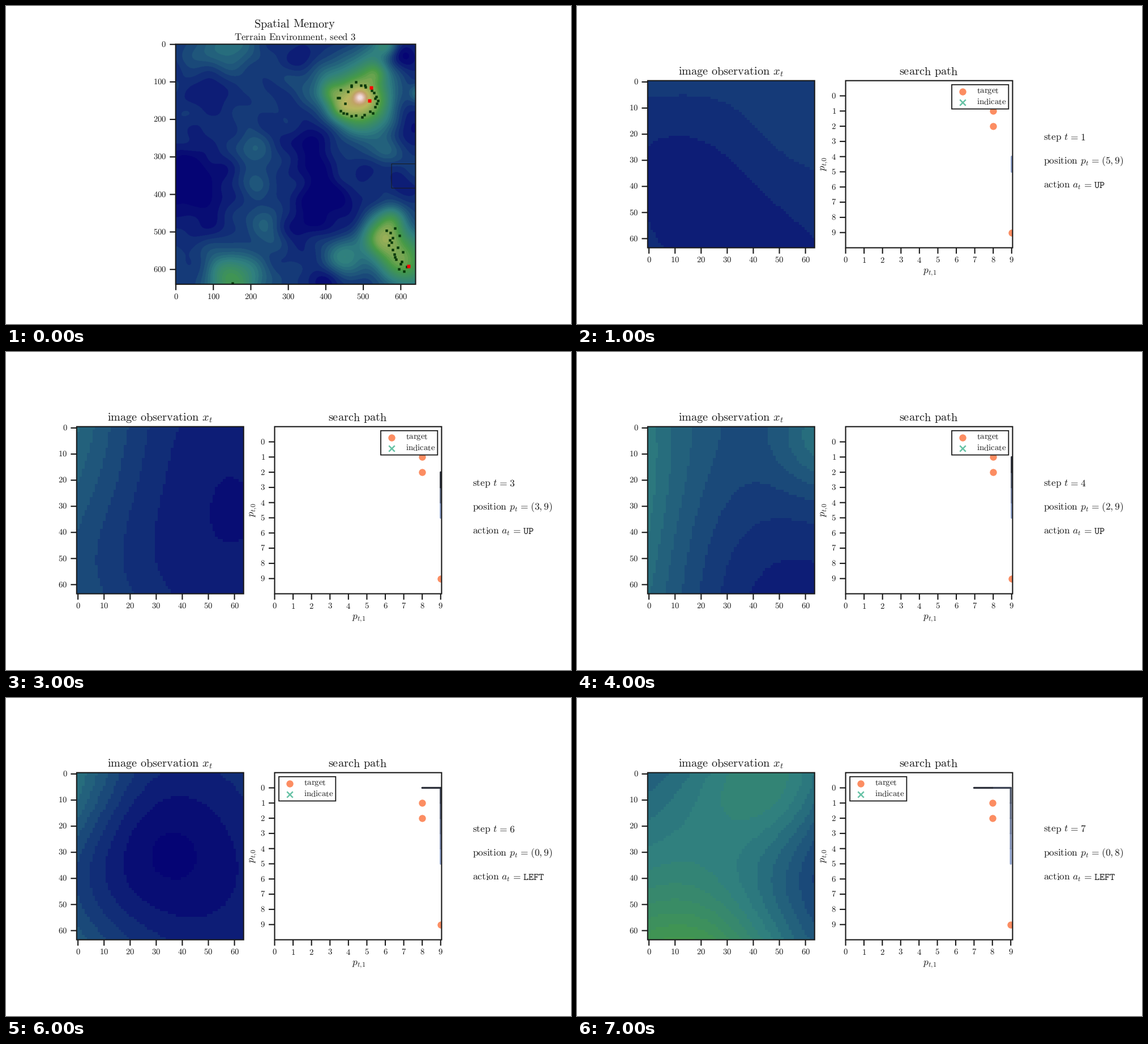
These frames come from a looping animation (998x561 px, 8000 ms). A matplotlib script:

```python
import matplotlib.pyplot as plt
import numpy as np
from matplotlib.animation import FuncAnimation
from matplotlib.colors import to_rgb
from matplotlib.patches import Rectangle

W, H, DPI = 998, 561, 64
PT = 72 / DPI  # points per pixel
INK = "0.1"
ORANGE, GREEN, BLUE, DARK = "#fc8d62", "#66c2a5", "#8da0cb", "#2b2f3a"
SIZE, CELL = 640, 64  # map and view side

plt.rcParams.update({"mathtext.fontset": "cm", "path.snap": False,
                     "text.hinting": "none"})
fig = plt.figure(figsize=(W / DPI, H / DPI), dpi=DPI, facecolor="white")
ax = fig.add_axes([0, 0, 1, 1])


# ---- terrain: round hills and pits, plus gentle noise -----------------

# x, y, radius, height
NORTH = [(490, 145, 58, 17), (490, 150, 42, 7), (491, 141, 12, 9),
         (412, 128, 20, 5), (440, 172, 22, 5), (533, 78, 20, 5),
         (520, 35, 28, 4.5), (560, 0, 22, 7), (648, 130, 15, 5)]
SOUTH = [(548, 508, 36, 14), (577, 468, 25, 7), (605, 572, 46, 16),
         (450, 560, 38, 7), (155, 632, 50, 12)]
SLOPES = [(130, 0, 55, 5), (380, 90, 38, 3), (560, 278, 28, 3)]
RIDGE = [(200 + 20 * i, 275 + 103 * i, 34, 3) for i in range(3)]
PITS = [(40, 375, 78, -4.5), (390, 430, 68, -4.5), (365, 260, 50, -3.5),
        (90, 120, 55, -1.8), (350, 15, 40, -2.5), (400, 635, 30, -3),
        (608, 30, 32, -3.6), (628, 205, 38, -2.8), (592, 365, 26, -2.3)]


def smooth_noise(rng, waves=60):
    """Sum of random plane waves with unit spread."""
    y, x = np.mgrid[:SIZE, :SIZE]
    total = np.zeros((SIZE, SIZE))
    for _ in range(waves):
        length, angle, phase = rng.uniform((60, 0, 0), (160, np.pi, 2 * np.pi))
        along = x * np.cos(angle) + y * np.sin(angle)
        total += np.cos(2 * np.pi * along / length + phase)
    return total * np.sqrt(2 / waves)


def make_terrain():
    y, x = np.mgrid[:SIZE, :SIZE]
    level = 2.6 + 0.45 * smooth_noise(np.random.default_rng(3))
    for cx, cy, radius, height in NORTH + SOUTH + SLOPES + RIDGE + PITS:
        r2 = (x - cx) ** 2 + (y - cy) ** 2
        level += height * np.exp(-r2 / (2 * radius**2))
    return np.maximum(0.054 + 0.026 * np.round(level), 0.036)


TERRAIN = make_terrain()


def view(row, col):
    t, l = row * CELL, col * CELL
    return TERRAIN[t:t + CELL, l:l + CELL]


# ---- drawing helpers, all in stage pixels ----------------------------

def label(x, y, s, size, ha="left", va="baseline", **kw):
    ax.text(x, y, s, fontsize=size * PT, ha=ha, va=va, color=INK, **kw)


def roman(s):
    s = s.replace(", ", r",\hspace{0.18}").replace(" ", r"\hspace{0.38}")
    return r"\mathrm{%s}" % s


def line(xs, ys, color=INK, width=2.1, cap="butt"):
    return ax.plot(xs, ys, color=color, lw=width * PT, solid_capstyle=cap)[0]


def dots(xs, ys, marker, size, color, stroke=0, zorder=2.5):
    return ax.scatter(xs, ys, s=(size * PT) ** 2, marker=marker, color=color,
                      lw=stroke * PT, zorder=zorder)


def box(l, t, r, b, width=2.1, face="none", **kw):
    patch = Rectangle((l, t), r - l, b - t, fc=face, ec=INK, lw=width * PT, **kw)
    return ax.add_patch(patch)


def panel(l, t, r, b, xticks, yticks):
    """Frame with ticks; each tick list holds (value, pixel) pairs."""
    for value, x in xticks:
        line([x, x], [b, b + 10.4])
        label(x, b + 26.3, f"${value}$", 14.7, ha="center")
    for value, y in yticks:
        line([l - 10.4, l], [y, y])
        label(l - 16.5, y + 4.9, f"${value}$", 14.7, ha="right")
    return box(l, t, r, b, zorder=3)


def image_panel(data, l, t, r, b, step):
    n = len(data)
    ax.imshow(data, cmap="gist_earth", vmin=0, vmax=1, aspect="auto",
              extent=(l, r, b, t),
              interpolation="nearest" if n == CELL else "antialiased")
    marks = [(v, (v + 0.5) / n) for v in range(0, n, step)]
    panel(l, t, r, b, [(v, l + f * (r - l)) for v, f in marks],
          [(v, t + f * (b - t)) for v, f in marks])


# ---- scenes ----------------------------------------------------------

GOALS = [(645.5, 143.5), (642.5, 167), (711, 458.5)]
TARGETS = [(1, 8), (2, 8), (9, 9)]
PATH = [(r, 9) for r in range(5, -1, -1)] + [(0, 8), (0, 7)]


def make_sites():
    """A ring around the north peak, a band down the south one, a stray."""
    rng = np.random.default_rng(8)
    angle = np.linspace(0, 2 * np.pi, 27) + rng.normal(0, 0.1, 27)
    radius = rng.uniform(24, 38, 27)
    ring = np.c_[623 + radius * np.cos(angle), 168 + radius * np.sin(angle)]
    y = np.linspace(392, 468, 19)
    band = np.c_[670 + 0.4 * (y - 392) + rng.normal(0, 8, 19), y]
    return np.vstack([ring, band, [(400.5, 489)]])


SITES = make_sites()


def draw_overview():
    label(510.5, 37.7, f"${roman('Spatial Memory')}$", 20.4, ha="center")
    label(511, 60.5, f"${roman('Terrain Environment, seed 3')}$", 17, ha="center")
    image_panel(TERRAIN, 299.7, 67.4, 723.5, 490.9, 100)
    dots(*SITES.T, "s", 4.4, "#06380a")
    dots(*zip(*GOALS), "s", 6, "#ff0000")
    box(681, 278.5, 723.5, 321.3, width=1, zorder=2)


def draw_legend(x):
    box(x, 138.8, x + 100.3, 181.6, width=1.8, face="white", zorder=4)
    dots([x + 19.5], [150.5], "o", 12.4, ORANGE, zorder=5)
    dots([x + 19.5], [169.8], "x", 10.5, GREEN, stroke=2.5, zorder=5)
    label(x + 44, 153.8, f"${roman('target')}$", 14.8, zorder=6)
    label(x + 44, 173.7, f"${roman('indicate')}$", 14.8, zorder=6)


def draw_search(step):
    l, t, r, b = 474.5, 131.7, 769.4, 426.5
    walk = PATH[:step + 1]
    span = max(1, 9 - walk[-1][1])
    sx = (r - l) / (9 + 0.05 * span)
    sy = (b - t) / 11

    def to_px(cells):
        rows, cols = np.array(cells).T
        return l + cols * sx, t + (rows + 1) * sy

    frame = panel(l, t, r, b, [(v, l + v * sx) for v in range(10)],
                  [(v, t + (v + 1) * sy) for v in range(10)])
    light, dark = np.array(to_rgb(BLUE)), np.array(to_rgb(DARK))
    for i in range(step):
        mix = i / max(step - 1, 1)
        part = line(*to_px(walk[i:i + 2]), color=light + (dark - light) * mix,
                    width=3.3, cap="round")
        part.set_clip_path(frame)
    dots(*to_px(TARGETS), "o", 12.4, ORANGE).set_clip_path(frame)

    label(621, 122, f"${roman('search path')}$", 20.3, ha="center")
    label(623, 470.5, r"$p_{t{,}1}$", 17.4, ha="center", va="center")
    label(437.5, 278.5, r"$p_{t{,}0}$", 17.4, ha="center", va="center", rotation=90)
    draw_legend(662 if step < 6 else 482)


def draw_step(step):
    row, col = PATH[step - 1]
    action = "UP" if row else "LEFT"
    gap, eq = r"\hspace{0.38}", r"\hspace{0.11}=\hspace{0.11}"

    label(271.5, 122, f"${roman('image observation')}{gap}x_t$", 20.3, ha="center")
    image_panel(view(row, col), 124.8, 131.7, 419.7, 426.5, 10)
    draw_search(step)
    label(824, 237, f"${roman('step')}{gap}t{eq}{step}$", 17.3)
    label(824, 279, f"${roman('position')}{gap}p_t{eq}({row},{col})$", 17.3)
    label(824, 321.3, rf"${roman('action')}{gap}a_t{eq}\mathtt{{{action}}}$", 17.3)


def draw(i):
    ax.clear()
    ax.set(xlim=(0, W), ylim=(H, 0))
    ax.axis("off")
    ax.autoscale(False)
    if i:
        draw_step(i)
    else:
        draw_overview()
    return []


anim = FuncAnimation(fig, draw, frames=8, interval=1000, repeat=True)
plt.show()
```
